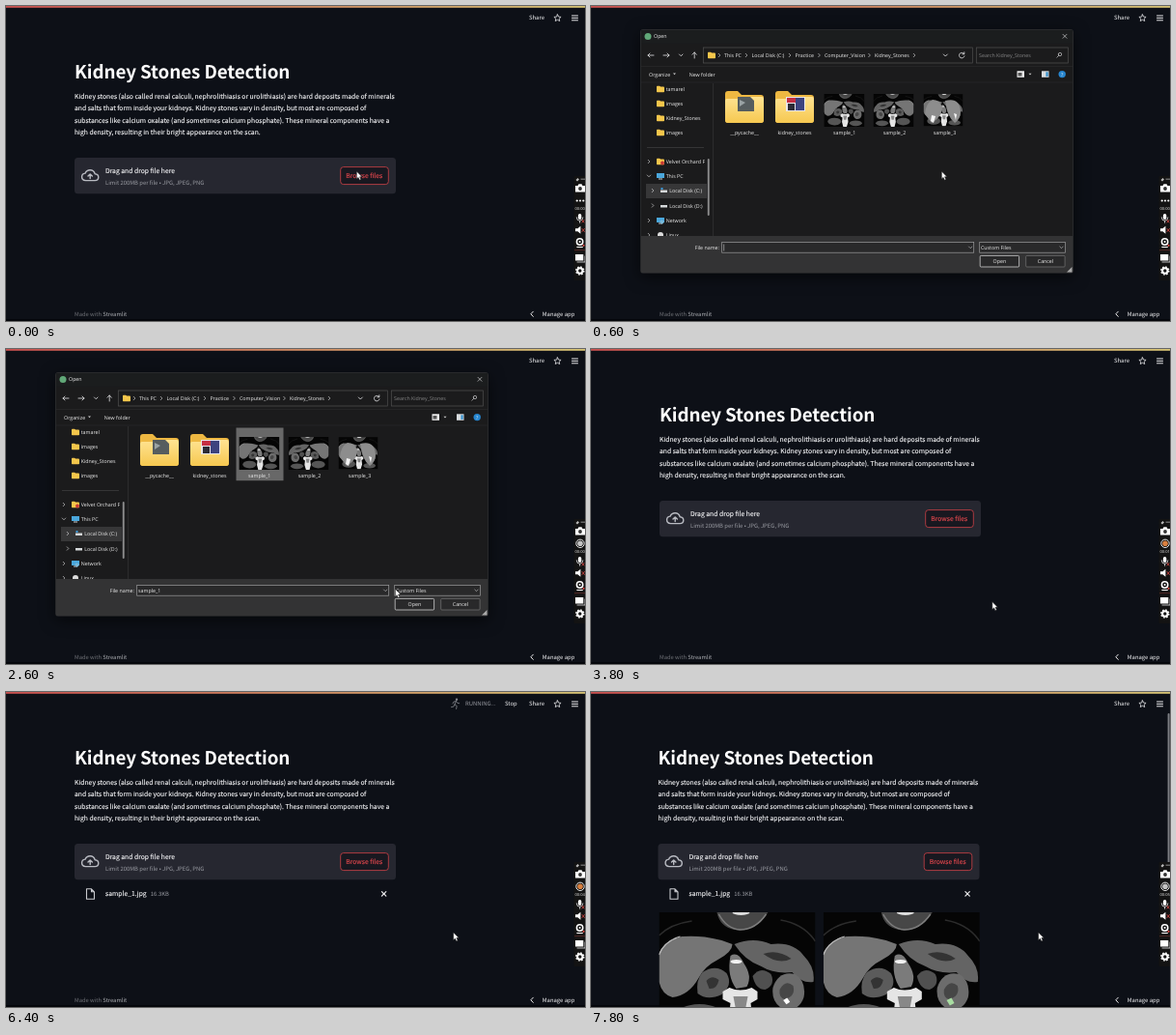
An HTML page for the animation above (8 s loop, 600 by 326 pixels).

```html
<!DOCTYPE html>
<html lang="en">
<head>
<meta charset="utf-8">
<title>Kidney Stones Detection</title>
<style>
html, body { margin: 0; width: 100%; height: 100%; overflow: hidden; background: #0d1017; }
svg { display: block; }
#stage { width: 600px; height: 326px; }
text { text-rendering: geometricPrecision; white-space: pre; }
.web { font-family: "Noto Sans CJK JP", "Noto Sans CJK SC", "Noto Sans CJK", "Open Sans", sans-serif; fill: #f6f6f8; }
.title { font-size: 18.82px; font-weight: 700; letter-spacing: -.1px; fill: #fff; }
.body { font-size: 6.79px; stroke: #f6f6f8; stroke-width: .13; }
.small { font-size: 5.92px; }
.dim { fill: #999ba2; }
.red { fill: #e0474d; stroke: #e0474d; }
.win { font-family: "Open Sans", "Noto Sans", sans-serif; font-size: 5.3px; fill: #ededed; }
.mid { text-anchor: middle; }
.line { fill: none; stroke: var(--ink, #e8e8ea); stroke-width: var(--w, .8); stroke-linecap: round; stroke-linejoin: round; }
.shadow { filter: drop-shadow(0 4px 8px rgba(0, 0, 0, .6)); }
</style>
</head>
<body>
<svg id="stage" viewBox="0 0 600 326">
  <defs>
    <linearGradient id="bar"><stop stop-color="#c9504f"/><stop offset="1" stop-color="#d6c374"/></linearGradient>
    <linearGradient id="folderFill" x2="0" y2="1"><stop stop-color="#ffe392"/><stop offset="1" stop-color="#f6c850"/></linearGradient>
    <clipPath id="treeClip"><rect x="52" y="80" width="66" height="158"/></clipPath>
    <symbol id="scan" viewBox="0 0 162 131">
      <rect width="162" height="131" fill="#050505"/>
      <path d="M0 24Q12 12 34 9M126 8Q150 12 162 30" fill="none" stroke="#2c2c2c" stroke-width="1.5"/>
      <path d="M60 0Q63 15 78 18Q98 21 113 0Z" fill="#474747"/>
      <path d="M62 2Q70 17 84 18Q100 18 111 2" fill="none" stroke="#7d7d7d" stroke-width="1.5"/>
      <ellipse cx="85" cy="0" rx="9" ry="3" fill="#ddd"/>
      <path d="M0 42Q7 28 24 25Q52 23 76 33Q76 41 61 49Q47 56 41 68Q31 86 14 88Q3 85 0 72Z" fill="#757575"/>
      <path d="M0 44Q5 30 22 25" fill="none" stroke="#bdbdbd" stroke-width="1.2"/>
      <path d="M45 62Q59 53 70 63Q77 75 65 85Q50 92 40 84Q38 70 45 62Z" fill="#5b5b5b"/>
      <path d="M49 71Q55 64 62 70Q60 80 52 79Z" fill="#333"/>
      <path d="M78 33Q98 25 116 33Q139 30 150 45Q162 57 160 72Q148 74 138 62Q119 64 106 56Q89 50 78 33Z" fill="#646464"/>
      <path d="M108 43Q123 38 137 48Q124 55 108 43Z" fill="#333"/>
      <path d="M74 45Q82 40 88 53Q97 66 91 77L80 79Q70 66 74 45Z" fill="#7b7b7b"/>
      <path d="M97 66Q105 55 116 64Q121 75 110 80Q100 80 97 66Z" fill="#505050"/>
      <path d="M118 78Q124 60 141 64Q153 72 150 88Q145 103 129 100Q116 94 118 78Z" fill="#6c6c6c"/>
      <path d="M125 80Q131 69 139 76Q142 87 130 90Q124 88 125 80Z" fill="#464646"/>
      <ellipse cx="42" cy="110" rx="27" ry="15" fill="#555"/>
      <ellipse cx="127" cy="117" rx="25" ry="11" fill="#555"/>
      <path d="M66 90V82L73 78Q84 83 96 78L102 82V90L95 94L97 112L91 131H77L72 112L74 94Z" fill="#e5e5e5"/>
      <path d="M77 87H92L89 103H80Z" fill="#888"/>
      <ellipse cx="80" cy="51" rx="6" ry="2" fill="#f2f2f2"/>
    </symbol>
    <symbol id="folder" viewBox="0 0 40 33">
      <path d="M0 3Q0 0 3 0H13L17 4H37Q40 4 40 7V30Q40 33 37 33H3Q0 33 0 30Z" fill="#eeb842"/>
      <path d="M0 10Q0 8 2 8H14L18 6H38Q40 6 40 9V30Q40 33 37 33H3Q0 33 0 30Z" fill="url(#folderFill)"/>
    </symbol>
    <symbol id="miniFolder" viewBox="0 0 8 7">
      <path d="M0 1Q0 0 1 0H3L4 1H7Q8 1 8 2V6Q8 7 7 7H1Q0 7 0 6Z" fill="#f5c64b"/>
    </symbol>
  </defs>

  <rect width="600" height="326" fill="#0d1017"/>
  <rect y="324" width="600" height="2" fill="#05070b"/>
  <rect width="600" height="1.8" fill="url(#bar)"/>
  <g id="running" style="--ink:#85878d">
    <path id="runner" class="line"/>
    <circle cx="467" cy="7.7" r="1.2" fill="#85878d"/>
    <text class="web small dim" x="476" y="14.4">RUNNING...</text>
    <text class="web small" x="517" y="14.4">Stop</text>
  </g>
  <text class="web small" x="542" y="14.4">Share</text>
  <path class="line" d="M571.5 8.8l1.1 2.3 2.5.3-1.9 1.7.5 2.5-2.2-1.3-2.2 1.3.5-2.5-1.9-1.7 2.5-.3z"/>
  <path class="line" style="--w:1" d="M586.5 10h6M586.5 12.4h6M586.5 14.8h6"/>
  <text class="web" x="71" y="321.3" font-size="5.8" style="fill:#6f7177">Made with <tspan font-weight="500" fill="#adafb4">Streamlit</tspan></text>

  <g id="main">
    <text class="web title" x="71" y="75.2">Kidney Stones Detection</text>
    <g id="intro"></g>
    <rect x="71" y="157" width="333" height="37.3" rx="3.5" fill="#262730"/>
    <path class="line" style="--w:1.4;--ink:#b9bbc2" d="M82.5 180.6q-3.9-.2-3.9-3.8 0-3.3 3.5-3.7 1.5-3.3 5-3.3 4 0 5.1 4 3.6.3 3.6 3.4 0 3.2-3.6 3.4zM87.2 178.5v-4.4m-2.2 2l2.2-2.2 2.2 2.2"/>
    <text class="web body" x="103" y="173.2">Drag and drop file here</text>
    <text class="web small dim" x="103" y="184.7">Limit 200MB per file • JPG, JPEG, PNG</text>
    <rect x="346.7" y="166.6" width="49.6" height="18" rx="3" fill="#181820" stroke="#bd3f45" stroke-width=".9"/>
    <text class="web body mid red" x="371.2" y="178.2">Browse files</text>
    <g id="upload">
      <path class="line" style="--w:1.1;--ink:#c9cacf" d="M83.5 203.8h5l3 3v7.5h-8zM88.5 203.8v3h3"/>
      <text class="web body" x="103" y="211.3">sample_1.jpg</text>
      <text class="web small dim" x="149.7" y="211.3">16.3KB</text>
      <path class="line" style="--w:1.2" d="M389.4 206.7l4.4 4.4m0-4.4l-4.4 4.4"/>
    </g>
    <g id="scanInput"><use href="#scan" x="72" y="228" width="162" height="131"/><path d="M200.7 319l4-2.6 3 4.4-3.7 2.5z" fill="#fff"/></g>
    <g id="scanResult"><use href="#scan" x="242.3" y="228" width="162" height="131"/><path d="M370 319l5-2.6 3 5.6-4.6 2.4z" fill="#a9dda2"/></g>
  </g>
  <rect id="scrollbar" x="597.6" y="22" width="2" height="156" rx="1" fill="#7c7e83"/>

  <g id="blank" class="shadow">
    <rect x="59" y="28" width="431" height="243" rx="2" fill="#343435"/>
    <path d="M59 42V30q0-2 2-2H488q2 0 2 2V42z" fill="#1d2022"/>
    <circle cx="66.5" cy="35.2" r="3.5" fill="#61a878"/>
    <text class="win" x="72" y="37.5">Open</text>
    <path class="line" style="--w:.6" d="M480 33l4 4m0-4l-4 4"/>
    <path d="M59 42h431v193H59zM113 241.5h25v7.5h-25zM139.5 240H391.5v10.7H139.5zM397 240h85.3v10.3H397zM397 253.3h40v12.2h-40zM442.5 253.3h40v9.7h7.5v8h-8v-5.5h-39.5z" fill="#fff"/>
  </g>

  <g id="dialog">
    <rect class="shadow" x="51.5" y="24.5" width="448" height="251.7" rx="2" fill="#1b1b1c" stroke="#3a3a3b" stroke-width=".6"/>
    <rect x="52" y="25" width="447" height="13.5" fill="#1b1d1e"/>
    <path d="M52 62.5h447M52 79h447" stroke="#2b2b2c" stroke-width=".6"/>
    <rect x="52" y="238" width="447" height="38" fill="#333334"/>
    <path d="M126.5 80v158" stroke="#343435" stroke-width=".7"/>
    <circle cx="59" cy="31.4" r="3.5" fill="#61a878"/>
    <path class="line" style="--w:.6" d="M489 29.3l4 4m0-4l-4 4"/>
    <path class="line" d="M65 51h-6m2-2l-2 2 2 2M75 51h6m-2-2l2 2-2 2M91.5 50l1.8 1.8L95 50M107.2 54v-6m-2.2 2.2l2.2-2.2 2.2 2.2M365.3 50l2 2 2-2"/>
    <path class="line" d="M386.6 49.5a2.8 2.8 0 1 0 .4 2.4M386.8 47.8v2h-2"/>
    <g fill="none" stroke="#505051" stroke-width=".7">
      <rect x="116.3" y="43" width="279" height="16"/><rect x="399.3" y="43" width="95" height="16"/>
    </g>
    <g id="crumbs"></g>
    <use href="#miniFolder" x="121" y="47.5" width="8" height="7"/>
    <path class="line" style="--w:.6" d="M484.8 51.2l-2 2M484.3 50a1.7 1.7 0 1 1 3.4 0a1.7 1.7 0 1 1-3.4 0"/>
    <path d="M85 69.5h3l-1.5 1.8zM453.5 69.7h3l-1.5 1.8z" fill="#ccc"/>
    <rect x="441.5" y="67.3" width="7.5" height="6.5" fill="#eee"/><rect x="442.5" y="69" width="4" height="3.5" fill="#555"/>
    <rect x="467" y="67.3" width="7.5" height="6.5" fill="#d9dde0"/><rect x="471.4" y="68.3" width="2.3" height="4.6" fill="#3a93cf"/>
    <circle cx="488.2" cy="70.6" r="3.7" fill="#2685cf"/><text class="win mid" x="488.2" y="72.6">?</text>
    <rect x="57" y="184" width="63" height="15" fill="#373738"/>
    <path d="M58 146.5h59" stroke="#474748" stroke-width=".6"/>
    <rect x="120.8" y="158" width="1.9" height="59" rx="1" fill="#8c8c8d"/>
    <g id="tree" clip-path="url(#treeClip)"></g>
    <rect id="pick" x="238.5" y="81.5" width="49" height="54.7"/>
    <use href="#folder" x="139" y="88" width="40" height="33"/>
    <path d="M152 94h13l4 4v11h-17z" fill="#565d5f"/><path d="M154 97l6 3-6 4z" fill="#9aa3a5"/>
    <use href="#folder" x="191" y="88" width="40" height="33"/>
    <path d="M202 94h20v15h-20z" fill="#e9e6ea"/><path d="M203 95h9v5h-9z" fill="#c62f43"/><path d="M212 95h9v13h-9z" fill="#3d437f"/><path d="M204 101h7v7h-7z" fill="#2c2b36"/>
    <use href="#scan" x="241.4" y="91" width="42" height="34"/>
    <use href="#scan" transform="translate(627 0) scale(-1 1)" x="292.5" y="91" width="42" height="34"/>
    <use href="#scan" x="344.5" y="91" width="41" height="33.5"/>
    <path d="M346 112q1-12 8-15 9 0 10 10-2 9-11 14zM367 98q15-4 16 11 0 8-6 12-8-6-10-23z" fill="#8d8d8d"/>
    <path d="M353 113l4 1-2 7-3-2zM376 111l3 1-1 6z" fill="#f3f3f3"/>
    <g fill="#29292a" stroke="#9c9c9d" stroke-width=".7">
      <rect x="135.7" y="244.6" width="261" height="10.6"/><rect x="402.7" y="244.6" width="88.8" height="10.6"/>
      <rect x="403.2" y="258.4" width="40.4" height="11.6" rx="1" stroke="#e2e2e2"/><rect x="450.7" y="258.4" width="40.4" height="11.6" rx="1" stroke="#777"/>
    </g>
    <path class="line" style="--w:.5" d="M391.5 249l1.7 1.7 1.7-1.7M485.8 249l1.7 1.7 1.7-1.7"/>
    <path id="caret" d="M137.7 246.5v7" stroke="#eee" stroke-width=".5"/>
    <text id="fileName" class="win" x="137" y="251.8">sample_1</text>
    <g id="labels"></g>
    <path d="M498.5 270v5.5h-5.5z" fill="#aaa"/>
  </g>

  <path class="line" style="--w:1" d="M546.3 316.2l-2.5 2.6 2.5 2.6"/>
  <text class="web small" x="555.8" y="321">Manage app</text>

  <g id="recorder">
    <rect x="588.5" y="176" width="12" height="108" rx="1" fill="#131313"/>
    <path d="M590.5 180l2-2 1.5 1.5-2 2zM595.5 178.8h4.5v.8h-4.5z" fill="#bbb"/>
    <path d="M590 186h2.5l1-1.8h3l1 1.8h2.5v6.5h-10z" fill="#fff"/><circle cx="595" cy="189" r="1.9" fill="#333"/>
    <g id="dots" fill="#fff"><circle cx="591.7" cy="201.5" r="1.1"/><circle cx="595" cy="201.5" r="1.1"/><circle cx="598.3" cy="201.5" r="1.1"/></g>
    <g id="record"><circle cx="595" cy="201.3" r="4.2" fill="none" stroke="#fff" stroke-width=".9"/><circle id="lamp" cx="595" cy="201.3" r="2.8"/></g>
    <text id="clock" class="win mid" x="594.7" y="210.9" style="font-size:4px"></text>
    <rect x="592.9" y="215" width="3.4" height="6" rx="1.7" fill="#fff"/><path class="line" d="M591.3 218.8q0 3.5 3.3 3.5t3.3-3.5M594.6 222.3v2"/>
    <path class="line" style="--ink:#db4b46" d="M597 221.5l2 2.5m0-2.5l-2 2.5M597 230.5l2.4 3m0-3l-2.4 3"/>
    <path d="M590 230.3h2.4l3-2.5v8l-3-2.5H590z" fill="#fff"/>
    <circle cx="594.6" cy="244" r="3.2" fill="none" stroke="#fff" stroke-width="1.5"/><circle cx="594.6" cy="244" r="1" fill="#fff"/><path d="M591.4 249.5h6.4" stroke="#fff"/><circle cx="598.5" cy="247.8" r="1.1" fill="#db4b46"/>
    <path d="M589 252.7h11" stroke="#7f3432" stroke-width=".6"/>
    <path d="M590 257h8.3v6.5H590z" fill="#fff"/><path class="line" d="M592 265h8v-6"/>
    <circle cx="594.8" cy="274" r="2.7" fill="none" stroke="#fff" stroke-width="2"/><circle cx="594.8" cy="274" r="4" fill="none" stroke="#fff" stroke-width="1.4" stroke-dasharray="1.57 1.57"/>
  </g>
  <path id="cursor" d="M0 0v8l1.8-1.6 1.3 2.8 1.5-.7-1.3-2.7h2.4z" fill="#fff" stroke="#111" stroke-width=".55"/>
</svg>
<script>
const $ = id => document.getElementById(id);
const text = (cls, x, y, words) => `<text class="${cls}" x="${x}" y="${y}">${words}</text>`;
const chevron = (x, y, open) => `<path class="line" style="--w:.6" d="${open ? `M${x - 1.8} ${y - 1}l1.8 1.8 1.8-1.8` : `M${x - .8} ${y - 1.7}l1.7 1.7-1.7 1.7`}"/>`;

$("intro").innerHTML = [
  "Kidney stones (also called renal calculi, nephrolithiasis or urolithiasis) are hard deposits made of minerals",
  "and salts that form inside your kidneys. Kidney stones vary in density, but most are composed of",
  "substances like calcium oxalate (and sometimes calcium phosphate). These mineral components have a",
  "high density, resulting in their bright appearance on the scan."
].map((line, i) => text("web body", 71, 96.3 + i * 12.1, line)).join("");

$("crumbs").innerHTML = [
  ["This PC", 138, 161], ["Local Disk (C:)", 166.5, 206], ["Practice", 211.5, 236.5],
  ["Computer_Vision", 242, 288.5], ["Kidney_Stones", 294, 335]
].map(([name, x, end]) => text("win", x, 52.9, name) + chevron(end, 51)).join("") + chevron(133, 51);

const icons = {
  folder: (x, y) => `<use href="#miniFolder" x="${x - 4}" y="${y - 3.5}" width="8" height="7"/>`,
  shared: (x, y) => icons.folder(x, y) + `<circle cx="${x + 2}" cy="${y + 1.5}" r="2" fill="#c93a36"/>`,
  screen: (x, y) => `<path d="M${x - 4} ${y - 3}h8v5h-8z" fill="#4aa7dc"/><path d="M${x - 2} ${y + 3}h4" stroke="#ccc"/>`,
  disk: (x, y) => `<path d="M${x - 3.5} ${y - .5}h7v2.5h-7z" fill="#d5d8da"/>`,
  system: (x, y) => icons.disk(x, y) + `<path d="M${x - 3} ${y - 3}h2v2h-2z" fill="#3d9bdd"/>`,
  net: (x, y) => icons.screen(x, y) + `<circle cx="${x + 1.5}" cy="${y + 1.5}" r="2" fill="#79b8d8"/>`,
  dot: (x, y) => `<circle cx="${x}" cy="${y}" r="3" fill="#dcdcdc"/>`
};
$("tree").innerHTML = [
  ["tamarel", 86, "folder"], ["images", 101, "folder"], ["Kidney_Stones", 116, "folder"], ["images", 131, "folder"],
  ["Velvet Orchard F", 161, "shared", 60], ["This PC", 176, "screen", 60, true],
  ["Local Disk (C:)", 191, "system", 64], ["Local Disk (D:)", 206.5, "disk", 64],
  ["Network", 222, "net", 60], ["Linux", 237, "dot", 60]
].map(([name, y, icon, arrow, open]) => {
  const indent = arrow === 64 ? 3.5 : 0;
  return icons[icon](72 + indent, y) + text("win", 77.7 + indent, y + 2, name) + (arrow ? chevron(arrow, y, open) : "");
}).join("");

$("labels").innerHTML = [
  ["", 65, 33.4, "Open"], ["", 60, 72.6, "Organize"], ["", 101.7, 72.6, "New folder"],
  ["", 107.7, 251.8, "File name:"], ["", 404, 251.8, "Custom Files"],
  ["mid", 423.4, 266.2, "Open"], ["mid", 471, 266.2, "Cancel"],
  ["mid", 159, 133.4, "__pycache__"], ["mid", 211, 133.4, "kidney_stones"],
  ["mid", 262.7, 133.4, "sample_1"], ["mid", 314.5, 133.4, "sample_2"], ["mid", 366.5, 133.4, "sample_3"]
].map(([cls, x, y, words]) => text("win " + cls, x, y, words)).join("")
  + `<g opacity=".5">${text("win", 402, 52.9, "Search Kidney_Stones")}</g>`;

const LOOP = 8000, STEP = 200;
// time, x, y of the pointer tip
const pointer = [
  [0, 363.3, 171], [800, 363.3, 171], [1400, 275, 116], [1600, 264, 109], [2000, 264, 109],
  [2600, 403.3, 248.3], [2800, 415.8, 261.5], [4200, 415.8, 261.5], [4800, 463.6, 248.8], [LOOP, 463.6, 248.8]
];
// visible from, until
const spans = {
  blank: [200, 400], dialog: [400, 3800], fileName: [1600, 3800], caret: [400, 1600], pick: [1400, 3800],
  upload: [5000, LOOP], running: [5200, 7600], scanInput: [7000, LOOP], scanResult: [7600, LOOP],
  scrollbar: [7000, LOOP], dots: [0, 2200], record: [2200, LOOP]
};
const strides = [
  "M466.5 9.5l-1.6 3.4 2.3 1.6-.6 3M464.9 12.9l-1 2.2-2.4.5M463 12l1-2 2.5-.5 1.4 2 1.8.2",
  "M466.5 9.5l-1.6 3.4 1.6 2-1.5 2.8M464.9 12.9l-.2 2.4-2.4 1.5M463.5 12.7l.5-2.5 2.5-.7 1 2.5 2-.5"
];

function pointerAt(t) {
  const i = pointer.findIndex(p => p[0] > t);
  const [t0, x0, y0] = pointer[i - 1], [t1, x1, y1] = pointer[i];
  const k = (t - t0) / (t1 - t0), ease = k * k * (3 - 2 * k);
  return [x0 + (x1 - x0) * ease, y0 + (y1 - y0) * ease];
}

function render(time) {
  const t = Math.floor(time % LOOP / STEP) * STEP;
  for (const [id, [from, until]] of Object.entries(spans))
    $(id).style.display = t >= from && t < until ? "" : "none";
  $("cursor").setAttribute("transform", `translate(${pointerAt(t)})`);
  $("main").setAttribute("transform", `translate(${t >= 7000 ? -1.5 : 0} 0)`);
  $("pick").setAttribute("fill", t < 1600 ? "#363637" : "#686868");
  $("runner").setAttribute("d", strides[t / STEP % 2]);
  const pulse = t % 2600;
  $("lamp").setAttribute("fill", pulse > 600 && pulse < 2000 ? "#d9803f" : "#c4c4c4");
  $("clock").textContent = "00:0" + Math.max(0, Math.floor((t - 2200) / 1000));
}

const start = performance.now();
function tick() {
  render(performance.now() - start);
  requestAnimationFrame(tick);
}
tick();
</script>
</body>
</html>
```
